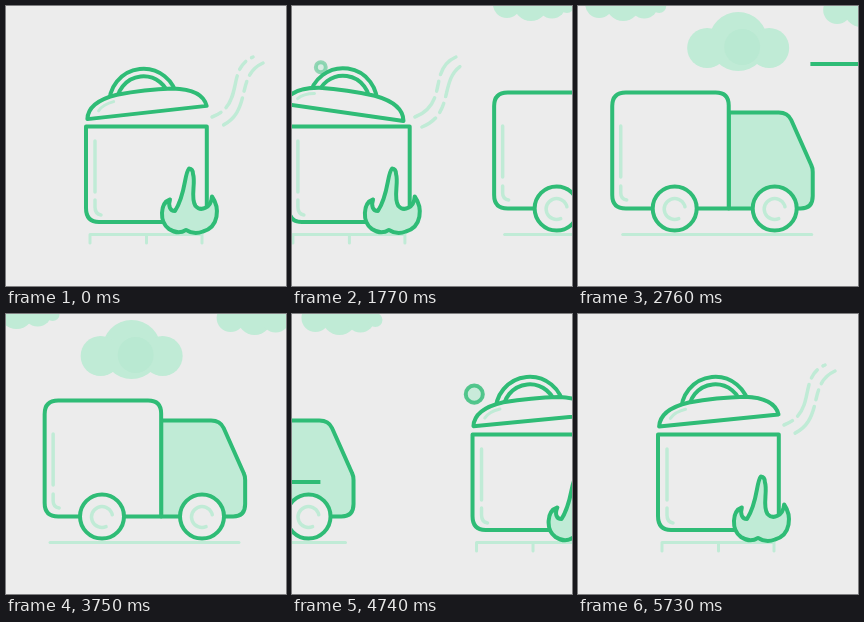
An HTML page with a canvas for the animation above (5.76 s loop, 280 by 280 pixels).

```html
<!DOCTYPE html>
<html lang="en">
<head>
<meta charset="utf-8">
<title>Pot and delivery truck</title>
<style>
html, body { margin: 0; width: 100%; height: 100%; overflow: hidden; background: #ececec; }
canvas { display: block; width: 280px; height: 280px; }
</style>
</head>
<body>
<canvas></canvas>
<script>
const LOOP = 5760, SLIDE = 1440, TAU = Math.PI * 2;
const BG = '#ececec', DARK = '#2fbc76', LIGHT = '#c0ebd6', SHADE = '#b9e9d2';
const canvas = document.querySelector('canvas');
const ctx = canvas.getContext('2d');
const dpr = window.devicePixelRatio || 1;
canvas.width = canvas.height = 280 * dpr;

const clamp = p => Math.min(1, Math.max(0, p));
const mix = (a, b, p) => a + (b - a) * p;
const smooth = p => (1 - Math.cos(Math.PI * clamp(p))) / 2;

// cubic-bezier(.25, .1, .25, 1)
function ease(p) {
  if (p <= 0) return 0;
  if (p >= 1) return 1;
  const curve = (a, b, s) => 3 * a * s * (1 - s) ** 2 + 3 * b * s * s * (1 - s) + s ** 3;
  let lo = 0, hi = 1;
  for (let i = 0; i < 24; i++) {
    const mid = (lo + hi) / 2;
    if (curve(.25, .25, mid) < p) lo = mid; else hi = mid;
  }
  return curve(.1, 1, lo);
}

function draw(d, stroke, fill, width = 4) {
  const path = typeof d === 'string' ? new Path2D(d) : d;
  if (fill) { ctx.fillStyle = fill; ctx.fill(path); }
  if (stroke) { ctx.strokeStyle = stroke; ctx.lineWidth = width; ctx.stroke(path); }
}

function circle(x, y, r, stroke, fill, width) {
  const path = new Path2D();
  path.arc(x, y, r, 0, TAU);
  draw(path, stroke, fill, width);
}

function at(x, y, angle, paint) {
  ctx.save();
  ctx.translate(x, y);
  ctx.rotate(angle);
  paint();
  ctx.restore();
}

const bubbles = [
  { from: -1350, to: -450, x: [95, 59], y: [100, 46], r: [10, 6] },
  { from: 60, to: 680, x: [92, 50], y: [108, 70], r: [9, 3] },
  { from: 80, to: 1100, x: [104, 118], y: [109, 60], r: [9, 5] },
  { from: 450, to: 1250, x: [160, 182], y: [108, 39], r: [7, 3.5] },
  { from: 870, to: 1870, x: [102, 113], y: [109, 56], r: [9, 4.5] }
];

function drawBubble(b, u) {
  const p = (u - b.from) / (b.to - b.from);
  if (p < 0 || p > 1) return;
  ctx.globalAlpha = .8 * Math.min(1, (1 - p) * 6);
  circle(mix(...b.x, p), mix(...b.y, p), mix(...b.r, p), DARK, LIGHT);
  ctx.globalAlpha = 1;
}

function drawLid(u) {
  const tilt = 1.2 - 8 * Math.cos(TAU * u / 1200 - .35);
  at(138.5 - .4 * tilt, 106.5, tilt * Math.PI / 180, () => {
    draw('M-36.5 -10a34 34 0 0 1 68 0M-29 -10a26.5 26.5 0 0 1 53 0', DARK);
    draw('M-60 0C-58 -14 -43 -19 -28 -21Q0 -23 28 -21C43 -19 58 -14 60 0Z', DARK, BG);
    draw('M-48 -7Q-43 -13 -32 -14.5', LIGHT, null, 3);
  });
}

function drawSteam(u) {
  ctx.setLineDash([10, 7, 34, 7]);
  ctx.lineDashOffset = -u * .02;
  draw('M206 111C240 98 219 63 247 51', LIGHT, null, 3.5);
  ctx.lineDashOffset = 12 - u * .02;
  draw('M213 121C248 107 228 70 257 57', LIGHT, null, 3.5);
  ctx.setLineDash([]);
}

function drawFlame(u) {
  const s = Math.sin(TAU * u / 1200);
  draw(`M${183 + s} 162.5C178 168 180 188 169 205C164 205 162 200 ${164 + s} 193.5
    C154 197 153 216 163 223Q172 229 180 224Q188 229 197 225.5
    C213 221 214 202 ${206 - s} 190.5C205 202 195 206 189.5 200
    C184 192 190 177 ${187 + s} 168Q${187 + s} 163 ${183 + s} 162.5Z`, DARK, LIGHT);
}

function drawPot(u) {
  draw('M84 237V228.5H196V237M140.5 228.5V237', LIGHT, null, 3);
  drawSteam(u);
  bubbles.forEach(b => drawBubble(b, u));
  draw('M80 120.5H200.8V216H93Q80 216 80 202Z', DARK, BG);
  draw('M89 135V186M89 194V201Q89 208 95 209', LIGHT, null, 3.5);
  drawLid(u);
  drawFlame(u);
}

function drawWheel(x, angle) {
  circle(x, 202.5, 22, DARK, BG);
  at(x, 203, angle, () => {
    const arc = new Path2D();
    arc.arc(0, 0, 10.5, 0, TAU * .78);
    draw(arc, LIGHT, null, 3.5);
  });
}

function drawTruck(t) {
  const rock = mix(-6, 1, smooth((t - 2700) / 1600));
  const spin = TAU * t / 990 + 2.5;
  draw('M44 228.5H233', LIGHT, null, 3);
  at(rock, 0, 0, () => {
    draw('M156 106.5H206Q215 106.5 218.5 114L238.5 159Q240 162 240 166V190Q240 202.5 228 202.5H156Z', DARK, LIGHT);
    draw('M53 86.5H143Q156 86.5 156 99.5V202.5H53Q39.5 202.5 39.5 189V100Q39.5 86.5 53 86.5Z', DARK, BG);
    draw('M48 120V171M48 180V187Q48 193 54 194', LIGHT, null, 3.5);
  });
  drawWheel(96, spin);
  drawWheel(196, spin);
}

function smallCloud(x, y) {
  [[14, 4, 14], [38, 3.5, 17.5], [59, 4, 14.5], [74, 6, 7]]
    .forEach(([dx, dy, r]) => circle(x + dx, y + dy, r, null, LIGHT));
}

function drawClouds(t) {
  const drift = -44 * Math.sin((t - 3150) / 1250);
  at(drift + 21, 0, 0, () => {
    circle(125, 35.5, 29.5, null, LIGHT);
    circle(94, 42, 20, null, LIGHT);
    circle(156, 42, 20, null, LIGHT);
    circle(129, 41, 18, null, SHADE);
    smallCloud(-28, -6);
    smallCloud(210, 0);
  });
}

function speedLine(x, y) {
  ctx.lineCap = 'butt';
  draw(`M${x} ${y}h60`, DARK);
  ctx.lineCap = 'round';
}

function render(now) {
  const t = now % LOOP;
  const u = t < LOOP / 2 ? t : t - LOOP;
  const leave = 280 * ease((t - 4205) / SLIDE);
  const potX = u >= 0 ? -280 * ease((t - 1482) / SLIDE) : 280 - leave;
  const truckX = 280 * (1 - ease((t - 1418) / SLIDE)) - leave;

  ctx.setTransform(dpr, 0, 0, dpr, 0, 0);
  ctx.fillStyle = BG;
  ctx.fillRect(0, 0, 280, 280);
  ctx.lineCap = ctx.lineJoin = 'round';

  if (Math.abs(truckX) < 280) {
    at(truckX, 0, 0, () => {
      drawClouds(t);
      drawTruck(t);
    });
  }
  if (Math.abs(potX) < 280) at(potX, 0, 0, () => drawPot(u));
  speedLine(233 - .6 * (t - 2760), 58);
  speedLine(-31 - .6 * (t - 4740), 168);
}

const start = performance.now();
function frame() {
  render(performance.now() - start);
  requestAnimationFrame(frame);
}
frame();
</script>
</body>
</html>
```
